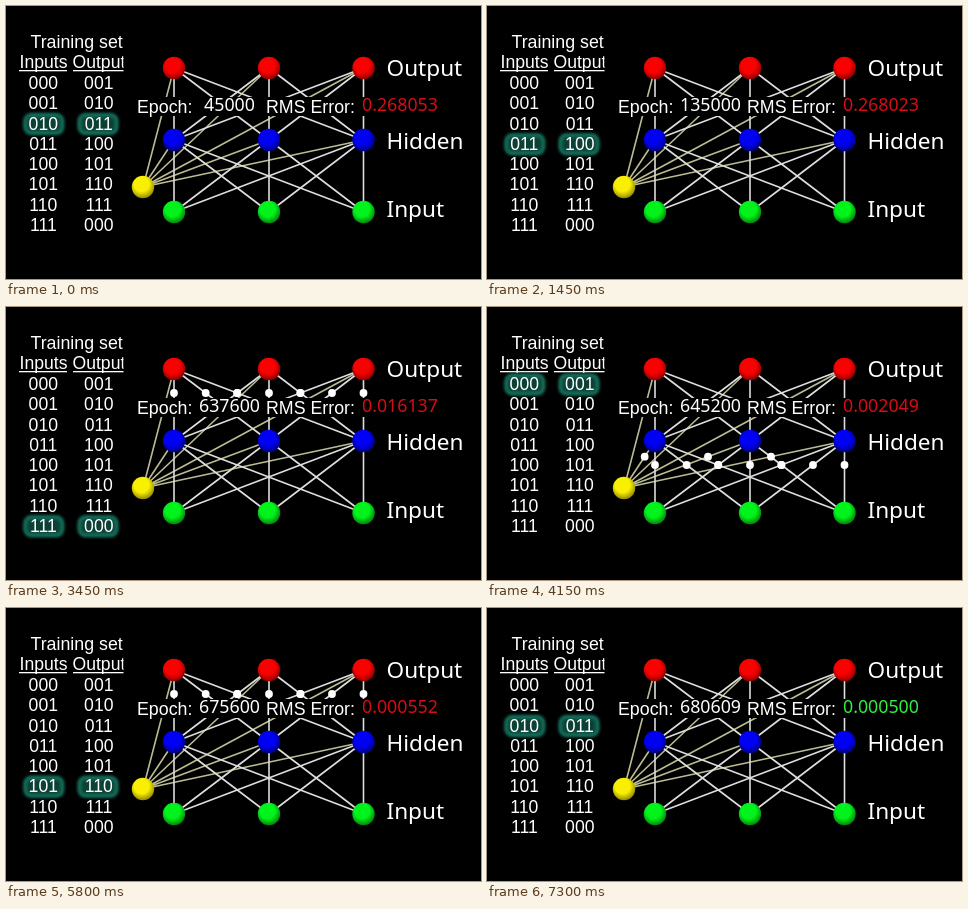
Animation, 475 px wide and 273 px high, one loop 7.35 s. Source, as an HTML page with a canvas:

```html
<!DOCTYPE html>
<html lang="en">
<head>
<meta charset="utf-8">
<title>Neural network training</title>
<style>
html, body { margin: 0; width: 100%; height: 100%; overflow: hidden; background: #000; }
canvas { display: block; }
</style>
</head>
<body>
<canvas id="stage" width="475" height="273"></canvas>
<script>
const ctx = document.getElementById('stage').getContext('2d');
const LOOP = 7350, TICK = 50, PASS = 24;
const SANS = '"Noto Sans", "Open Sans", sans-serif';
const ARIAL = '"Liberation Sans", Arial, sans-serif';

// Each sample has three stages: at rest, signals to hidden, signals to output.
// [tick, stages played so far]
const PACE = [[0, 6], [29, 57], [50, 103], [69, 143], [97, 195], [116, 233], [146, 294]];

// Counter readings, one for each pass through the eight samples
const READINGS = [
  [45000, 0.268053], [90000, 0.268036], [135000, 0.268023], [360000, 0.268015],
  [630000, 0.268008], [637600, 0.016137], [641400, 0.003636], [645200, 0.002049],
  [652800, 0.001093], [675600, 0.000552], [679400, 0.000512], [680200, 0.000504],
  [680609, 0.0005]
];

const layer = y => [168, 263, 357.5].map(x => ({ x, y }));
const outputs = layer(62), hidden = layer(134), inputs = layer(206);
const bias = { x: 137, y: 181 };
const link = (from, to) => from.flatMap(a => to.map(b => [a, b]));
const toHidden = link(inputs, hidden), toOutput = link(hidden, outputs);
const biasHidden = link([bias], hidden), biasOutput = link([bias], outputs);

const bits = n => (n % 8).toString(2).padStart(3, '0');
const rowY = i => 77 + i * 20.25;

function text(str, x, y, size, family, color = '#fff', align = 'left') {
  ctx.font = `${size}px ${family}`;
  ctx.fillStyle = color;
  ctx.textAlign = align;
  ctx.fillText(str, x, y);
}

function lines(links, color) {
  ctx.strokeStyle = color;
  ctx.lineWidth = 1.6;
  ctx.beginPath();
  for (const [a, b] of links) {
    ctx.moveTo(a.x, a.y);
    ctx.lineTo(b.x, b.y);
  }
  ctx.stroke();
}

function disc(x, y, r, fill) {
  ctx.fillStyle = fill;
  ctx.beginPath();
  ctx.arc(x, y, r, 0, Math.PI * 2);
  ctx.fill();
}

function signals(links) {
  const k = 2 / 3;
  for (const [a, b] of links) disc(a.x + (b.x - a.x) * k, a.y + (b.y - a.y) * k, 3.9, '#fff');
}

function ball({ x, y }, main, dark) {
  const g = ctx.createRadialGradient(x - 2, y - 4, 1, x - 1, y - 2, 14);
  g.addColorStop(0, main);
  g.addColorStop(0.5, main);
  g.addColorStop(1, dark);
  disc(x, y, 11.2, g);
}

function glow(cx, cy) {
  ctx.save();
  ctx.filter = 'blur(1.6px)';
  ctx.beginPath();
  ctx.roundRect(cx - 18.5, cy - 9, 37, 18, 6);
  ctx.fillStyle = '#0b4034';
  ctx.fill();
  ctx.strokeStyle = '#167460';
  ctx.lineWidth = 4;
  ctx.stroke();
  ctx.restore();
}

function table(active) {
  ctx.save();
  ctx.beginPath();
  ctx.rect(0, 0, 117.5, 273);
  ctx.clip();
  text('Training set', 24.5, 42, 17.8, ARIAL);
  text('Inputs', 13.5, 62, 17.6, ARIAL);
  text('Output', 66.5, 62, 17.6, ARIAL);
  ctx.fillRect(13, 64, 48, 1.3);
  ctx.fillRect(67, 64, 51, 1.3);
  glow(37.8, rowY(active) + 0.5);
  glow(92, rowY(active) + 0.5);
  for (let i = 0; i < 8; i++) {
    const y = rowY(i) + 6;
    text(bits(i), 37.3, y, 17.6, ARIAL, '#fff', 'center');
    text(bits(i + 1), 92.8, y, 17.6, ARIAL, '#fff', 'center');
  }
  ctx.restore();
}

function network(stage) {
  lines(biasHidden.concat(biasOutput), '#bcbc94');
  lines(toHidden.concat(toOutput), '#dedede');
  if (stage === 1) signals(toHidden.concat(biasHidden));
  if (stage === 2) signals(toOutput.concat(biasOutput));
  outputs.forEach(p => ball(p, '#fa0000', '#880000'));
  hidden.forEach(p => ball(p, '#0000f4', '#000078'));
  inputs.forEach(p => ball(p, '#00f41c', '#007c08'));
  ball(bias, '#f8f000', '#8c8000');
  text('Output', 380.5, 70, 22.6, SANS);
  text('Hidden', 380.5, 143, 22.6, SANS);
  text('Input', 380.5, 211, 22.6, SANS);
}

function counters([epoch, error]) {
  ctx.fillStyle = '#000';
  ctx.fillRect(131, 91, 304, 19);
  text('Epoch:', 131, 106.5, 17.8, ARIAL);
  text(epoch, 223.5, 105.2, 17.8, SANS, '#fff', 'center');
  text('RMS Error:', 260, 106.5, 17.8, ARIAL);
  text(error.toFixed(6), 356, 105.2, 17.8, SANS, error > 0.0005 ? '#d80c14' : '#30f040');
}

function progress(tick) {
  const i = Math.max(1, PACE.findIndex(p => p[0] >= tick));
  const [t0, n0] = PACE[i - 1], [t1, n1] = PACE[i];
  return Math.floor(n0 + (n1 - n0) * (tick - t0) / (t1 - t0) + 1e-6);
}

function draw(ms) {
  const step = progress(Math.floor((ms % LOOP) / TICK));
  ctx.fillStyle = '#000';
  ctx.fillRect(0, 0, 475, 273);
  table(Math.floor(step / 3) % 8);
  network(step % 3);
  counters(READINGS[Math.floor(step / PASS)]);
}

const start = performance.now();
function loop() {
  draw(performance.now() - start);
  requestAnimationFrame(loop);
}
loop();
</script>
</body>
</html>
```
